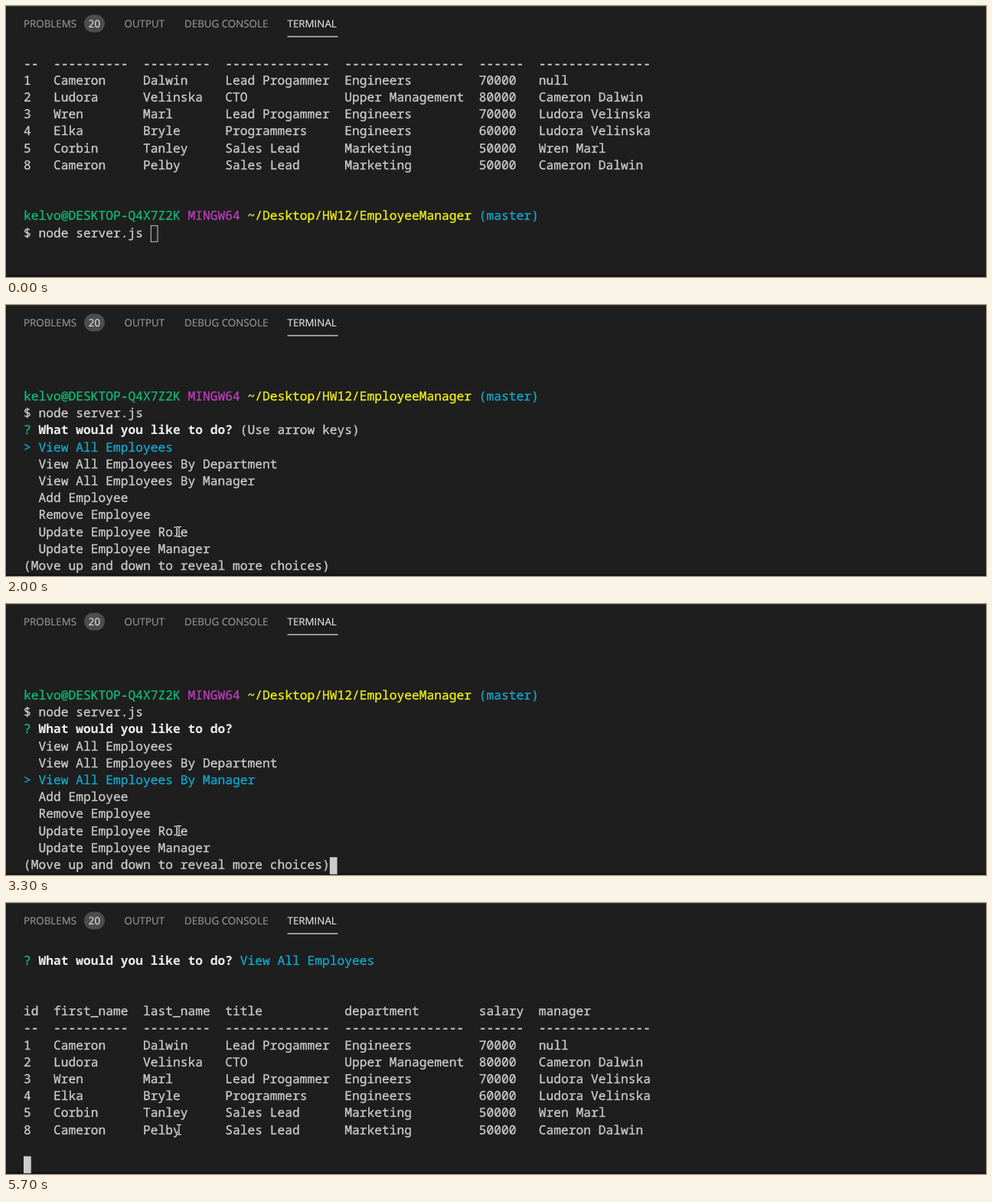
An HTML page for the animation above (8 s loop, 1280x355 px).

```html
<!DOCTYPE html>
<html lang="en">
<head>
<meta charset="utf-8">
<title>Terminal session</title>
<style>
  html, body { margin: 0; width: 100%; height: 100%; overflow: hidden; background: #1e1e1e; }
  svg { display: block; width: 100%; height: 100%; }
  text { text-rendering: geometricPrecision; white-space: pre; }
  text, tspan { fill: currentColor; stroke: currentColor; stroke-width: .3; }
  #tabs { font: 13.35px "Open Sans", "Noto Sans", sans-serif; color: #979797; }
  #tabs text { stroke-width: .15; }
  #tabs .active { color: #e7e7e7; }
  #screen { font: 16.253px "Noto Sans Mono", "Liberation Mono", monospace; color: #ccc; }
  #screen .green { color: #0dbc79; }
  #screen .magenta { color: #bc3fbc; }
  #screen .yellow { color: #f2f210; }
  #screen .cyan { color: #11a8cd; }
  #screen .bold { color: #f0f0f0; font-weight: 700; stroke: none; }
</style>
</head>
<body>
<svg viewBox="0 0 1280 355">
  <defs>
    <path id="beam" d="M-3-6.5H-1L0-5.5 1-6.5H3M0-5.5V5.5M-3 6.5H-1L0 5.5 1 6.5H3" fill="none"/>
  </defs>
  <rect width="1280" height="355" fill="#1e1e1e"/>
  <rect width="1280" height="1" fill="#333"/>
  <rect y="352" width="1280" height="3" fill="#1a1416"/>
  <g id="tabs">
    <text x="23" y="27.5">PROBLEMS</text>
    <rect x="102" y="11.5" width="27" height="23" rx="11.5" fill="#4d4d4d"/>
    <text x="115.5" y="27.5" text-anchor="middle" class="active">20</text>
    <text x="154.5" y="27.5">OUTPUT</text>
    <text x="233" y="27.5">DEBUG CONSOLE</text>
    <text x="367.5" y="27.5" class="active">TERMINAL</text>
    <rect x="367.5" y="39.5" width="66" height="1.2" fill="#e7e7e7"/>
  </g>
  <g id="screen"></g>
  <g id="mouse">
    <use href="#beam" stroke="#1e1e1e" stroke-width="2.6"/>
    <use href="#beam" stroke="#eee" stroke-width="1.1"/>
  </g>
</svg>
<script>
const LOOP = 8000, LEFT = 23, BASE = 80.5, CELL = 9.752, LINE = 22.2;
const screen = document.getElementById('screen');
const mouse = document.getElementById('mouse');

const paint = (color, text) => `<tspan class="${color}">${text}</tspan>`;

// Table
const widths = [2, 10, 9, 14, 16, 6, 15];
const formatRow = cells => cells.map((cell, i) => cell.padEnd(widths[i])).join('  ');
const header = formatRow(['id', 'first_name', 'last_name', 'title', 'department', 'salary', 'manager']);
const table = [
  widths.map(w => '-'.repeat(w)),
  ['1', 'Cameron', 'Dalwin', 'Lead Progammer', 'Engineers', '70000', 'null'],
  ['2', 'Ludora', 'Velinska', 'CTO', 'Upper Management', '80000', 'Cameron Dalwin'],
  ['3', 'Wren', 'Marl', 'Lead Progammer', 'Engineers', '70000', 'Ludora Velinska'],
  ['4', 'Elka', 'Bryle', 'Programmers', 'Engineers', '60000', 'Ludora Velinska'],
  ['5', 'Corbin', 'Tanley', 'Sales Lead', 'Marketing', '50000', 'Wren Marl'],
  ['8', 'Cameron', 'Pelby', 'Sales Lead', 'Marketing', '50000', 'Cameron Dalwin']
].map(formatRow);

// Prompt and menu
const prompt = [
  paint('green', 'kelvo@DESKTOP-Q4X7Z2K'), paint('magenta', 'MINGW64'),
  paint('yellow', '~/Desktop/HW12/EmployeeManager'), paint('cyan', '(master)')
].join(' ');
const command = '$ node server.js';
const question = paint('green', '?') + ' ' + paint('bold', 'What would you like to do?');
const options = [
  'View All Employees', 'View All Employees By Department', 'View All Employees By Manager',
  'Add Employee', 'Remove Employee', 'Update Employee Role', 'Update Employee Manager',
  'Remove Department', 'Quit'
];

function menu(first, selected, hint = '') {
  const choices = Array.from({ length: 7 }, (_, i) => {
    const label = options[(first + i + options.length) % options.length];
    return i === selected ? paint('cyan', '&gt; ' + label) : '  ' + label;
  });
  return ['', '', prompt, command, question + hint, ...choices, '(Move up and down to reveal more choices)'];
}

const shell = [...table, '', '', prompt, command];
const result = [question + ' ' + paint('cyan', options[0]), '', '', header, ...table];
const menuEnd = [41, 12];

// Each state: start time, lines, cursor cell [column, row], hollow cursor
const states = [
  [0, shell, [17, 10], true],
  [800, shell, [17, 10]],
  [1700, shell, [0, 11]],
  [2000, menu(0, 0, ' (Use arrow keys)')],
  [2900, menu(0, 1), menuEnd],
  [3300, menu(0, 2), menuEnd],
  [4300, menu(-1, 2), menuEnd],
  [4500, menu(-2, 2), menuEnd],
  [5700, result, [0, 12]]
];

function cursorBlock([column, row], hollow) {
  const x = LEFT + column * CELL, y = BASE + row * LINE - 15.2;
  return hollow
    ? `<rect x="${x + .5}" y="${y + .5}" width="${CELL - 1}" height="21" fill="none" stroke="#ccc"/>`
    : `<rect x="${x}" y="${y}" width="${CELL}" height="22.4" fill="#ccc"/>`;
}

function drawScreen([, lines, cell, hollow]) {
  screen.innerHTML = lines.map((line, row) =>
    `<text x="${LEFT}" y="${BASE + row * LINE}">${line}</text>`).join('') +
    (cell ? cursorBlock(cell, hollow) : '');
}

function drawMouse(t) {
  const step = Math.min(1, Math.floor((t - 200) / 100) / 5);
  const eased = Math.sin(step * Math.PI / 2);
  mouse.style.display = t < 200 ? 'none' : '';
  mouse.setAttribute('transform', `translate(${90.5 + 135.5 * eased} ${60 + 237 * eased})`);
}

let shown;
function frame() {
  const t = performance.now() % LOOP;
  const state = states.findLast(([start]) => start <= t);
  if (state !== shown) drawScreen(shown = state);
  drawMouse(t);
  requestAnimationFrame(frame);
}
frame();
</script>
</body>
</html>
```
